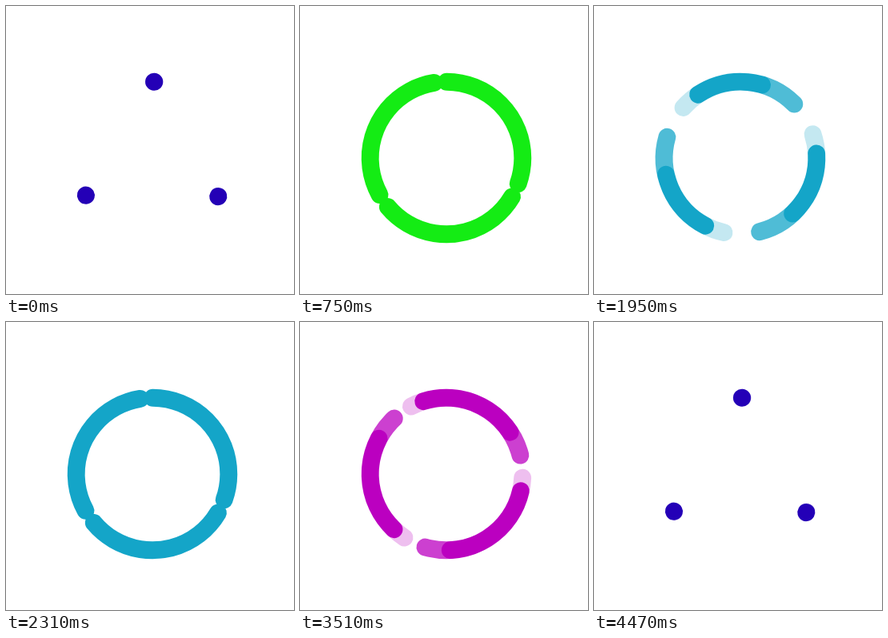
An HTML page with a canvas for the animation above (4.5 s loop, 360 px wide and 360 px high).

```html
<!DOCTYPE html>
<html lang="en">
<head>
<meta charset="utf-8">
<title>Ring loader</title>
<style>
  html, body { margin: 0; width: 100%; height: 100%; overflow: hidden; background: #fff; }
  canvas { display: block; width: 360px; height: 360px; }
</style>
</head>
<body>
<canvas id="stage" width="360" height="360"></canvas>
<script>
const ctx = document.getElementById('stage').getContext('2d');
const LOOP = 4500, HALF = 750, TICK = 30, POSE = 40, DELAY = 20;
const CENTER = { x: 183, y: 190 }, RADIUS = 95.3, WIDTH = 21.9;
const OFFSETS = [0.2, 120.6, 241.2], SPAN = 109.6;
const COLORS = ['#2400b6', '#14ec14', '#d4a50f', '#14a5c8', '#ba00c0'];
const COLOR_TIME = LOOP / COLORS.length, COLOR_START = 60;

const lerp = (a, b, p) => a + (b - a) * p;
const wrap = time => (time + LOOP) % LOOP;
const easeInOut = (p, power) => p < 0.5
  ? 0.5 * (2 * p) ** power
  : 1 - 0.5 * (2 - 2 * p) ** power;

function colorAt(time) {
  const index = Math.floor(wrap(time - COLOR_START) / COLOR_TIME);
  return COLORS[(index + 1) % COLORS.length];
}

// Grow while turning one third, then let the tail catch up with the head.
function poseAt(time) {
  const phase = wrap(time - DELAY) % (2 * HALF);
  const p = (phase % HALF) / HALF;
  if (phase < HALF) {
    const e = easeInOut(p, 3);
    return { tail: lerp(-120, 0, e), head: lerp(-120, SPAN, e) };
  }
  const e = easeInOut(p, 3.4);
  return { tail: lerp(0, 120, e), head: lerp(SPAN, 120, e) };
}

function drawPose(time, alpha) {
  const angle = deg => (deg - 90) * Math.PI / 180;
  const { tail, head } = poseAt(time);
  ctx.globalAlpha = alpha;
  ctx.strokeStyle = colorAt(time);
  ctx.beginPath();
  for (const offset of OFFSETS) {
    const from = angle(tail + offset);
    const to = Math.max(angle(head + offset), from + 0.004);
    ctx.moveTo(CENTER.x + RADIUS * Math.cos(from), CENTER.y + RADIUS * Math.sin(from));
    ctx.arc(CENTER.x, CENTER.y, RADIUS, from, to);
  }
  ctx.stroke();
}

// Neighbouring poses cross-fade; additive alpha keeps their overlap solid.
function render(now) {
  const time = Math.floor((now % LOOP) / TICK) * TICK;
  const base = Math.floor(time / POSE) * POSE;
  const mix = (time - base) / POSE;
  ctx.clearRect(0, 0, 360, 360);
  ctx.globalCompositeOperation = 'lighter';
  ctx.lineWidth = WIDTH;
  ctx.lineCap = 'round';
  drawPose(base, 1 - mix);
  if (mix > 0) drawPose(wrap(base + POSE), mix);
}

const start = performance.now();
function loop() {
  render(performance.now() - start);
  requestAnimationFrame(loop);
}
loop();
</script>
</body>
</html>
```
